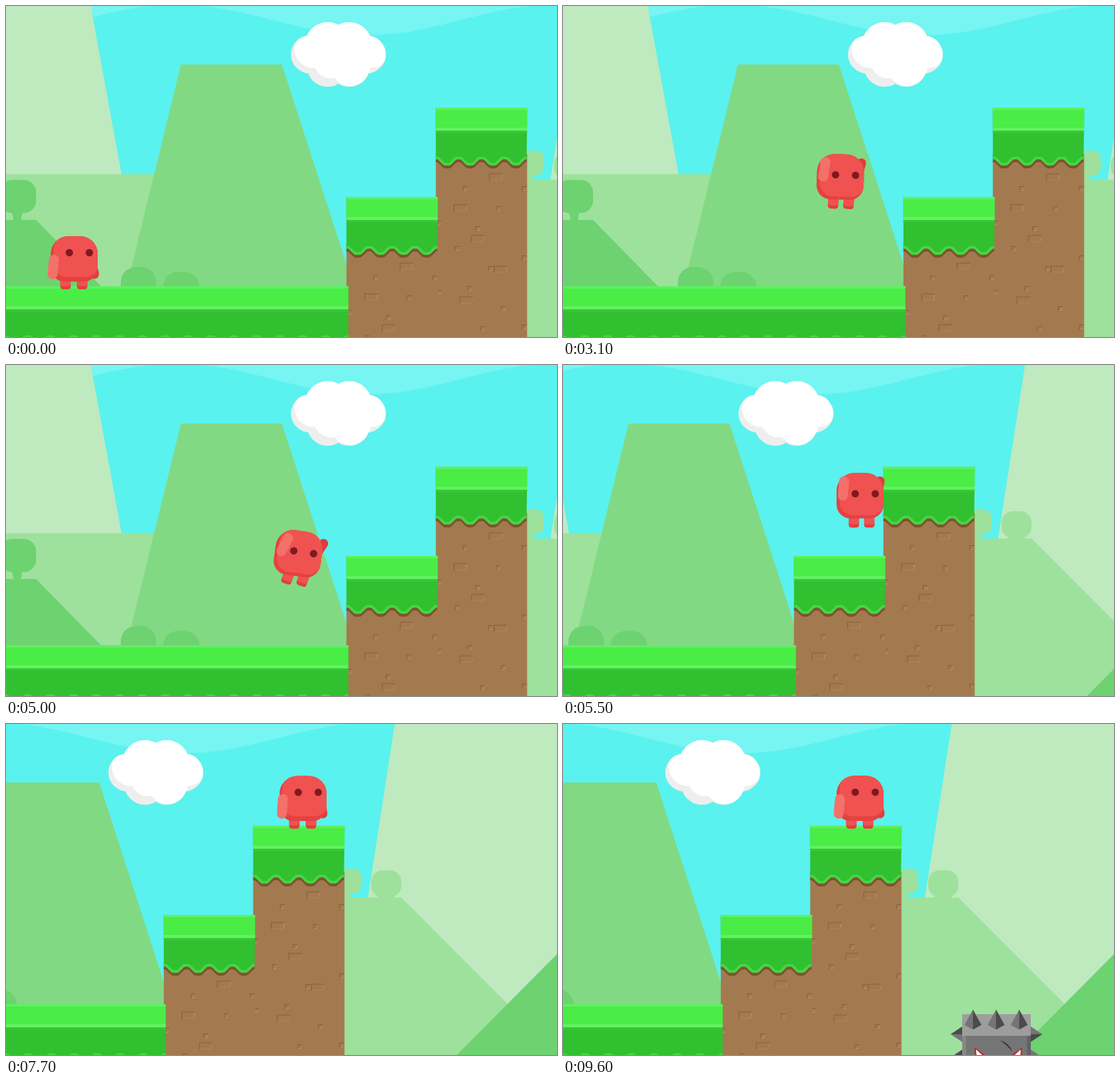
Animation of 715x430 px, one loop 9700 ms. Source, as an HTML page with a canvas:

```html
<!DOCTYPE html>
<html lang="en">
<head>
<meta charset="utf-8">
<title>Platform jump</title>
<style>
  html, body { margin: 0; width: 100%; height: 100%; overflow: hidden; background: #5af2ee; }
  canvas { display: block; }
</style>
</head>
<body>
<canvas id="stage" width="715" height="430"></canvas>
<script>
const ctx = document.getElementById('stage').getContext('2d');
const W = 715, H = 430, LOOP = 9700, STEP = 100;
const GRAVITY = 1412, JUMP = 565, AIR_JUMP = 524, HOP = 339;
const SKY = '#5af2ee', HAZE = '#76f5f3', FAR = '#bfe9bf', MID = '#9de19c', PEAK = '#82d983', NEAR = '#6dd270';
const GROUND = 368, LEDGE = 252, TOP = 136;

const START_X = 88;
// Runs: start and end in seconds, distance
const RUNS = [[2.055, 3.13, 279], [4.963, 5.5, 160], [5.96, 6.2, 61.5], [6.58, 6.75, 33.5]];
// Jumps: seconds, take-off speed, height of the floor below
const JUMPS = [
  [2.59, JUMP, GROUND], [4.35, JUMP, GROUND], [4.985, AIR_JUMP, LEDGE],
  [5.7, JUMP, LEDGE], [5.85, AIR_JUMP, TOP], [6.58, HOP, TOP]
];

const clamp = (v, a, b) => Math.max(a, Math.min(b, v));
const mix = (a, b, k) => a + (b - a) * k;

const walkX = t => RUNS.reduce((x, [a, b, d]) => x + d * clamp((t - a) / (b - a), 0, 1), START_X);

// Each jump takes off from wherever the one before has brought the feet
function feet(t) {
  let jump = [0, 0, GROUND], from = GROUND;
  const at = time => {
    const [t0, v, floor] = jump, d = time - t0;
    const y = from - v * d + GRAVITY / 2 * d * d;
    const landed = GRAVITY * d >= v && y >= floor;
    return { y: landed ? floor : y, air: !landed };
  };
  for (const next of JUMPS) {
    if (next[0] > t) break;
    from = at(next[0]).y;
    jump = next;
  }
  return at(t);
}

// Patrolling block bounces between the wall and a far turning point
function blockX(t) {
  const speed = 195, half = 2.3885, hit = 4.5;
  const d = Math.abs(((t - hit) % (2 * half) + 3 * half) % (2 * half) - half);
  return 677 + speed * d;
}

function poly(fill, ...p) {
  ctx.fillStyle = fill;
  ctx.beginPath();
  for (let i = 0; i < p.length; i += 2) ctx.lineTo(p[i], p[i + 1]);
  ctx.fill();
}

function rect(fill, x, y, w, h) {
  ctx.fillStyle = fill;
  ctx.fillRect(x, y, w, h);
}

function round(fill, x, y, w, h, r) {
  ctx.fillStyle = fill;
  ctx.beginPath();
  ctx.roundRect(x, y, w, h, r);
  ctx.fill();
}

function disc(x, y, r) {
  ctx.moveTo(x + r, y);
  ctx.arc(x, y, r, 0, 7);
}

function puffs(x, y, low) {
  ctx.beginPath();
  for (const s of [-1, 1]) {
    disc(x + 37 * s, y, 24.5);
    disc(x + 14 * s, y - 12.5, 29.5);
    disc(x + 14 * s, y + 15, low);
  }
}

function cloud() {
  ctx.save();
  puffs(431.3, 63, 27);
  ctx.fillStyle = '#eeeeee';
  ctx.fill();
  ctx.clip();
  puffs(436, 56, 23);
  disc(447, 78, 26);
  ctx.fillStyle = '#fff';
  ctx.fill();
  ctx.restore();
}

function backdrop() {
  ctx.fillStyle = HAZE;
  ctx.beginPath();
  ctx.moveTo(0, 0);
  for (let x = 0; x <= 960; x += 6) ctx.lineTo(x, Math.max(0, 18 + 20 * Math.cos((x - 468) / 78.5)));
  ctx.lineTo(960, 0);
  ctx.fill();

  poly(FAR, 0, 0, 110, 0, 150, 219, 0, 219);
  rect(MID, 0, 218.5, 200, 150);
  poly(PEAK, 227, 76, 358, 76, 452, 367, 156, 367);
  poly(NEAR, 0, 278, 39, 278, 124, 365, 0, 365);
  round(NEAR, -8, 226, 47, 43, 16);
  poly(NEAR, 7, 264, 22, 264, 19, 279, 10, 279);
  round(NEAR, 149, 339, 46, 50, 20);
  round(NEAR, 204, 345.5, 47, 50, 19);

  poly(FAR, 741.5, 0, 960, 0, 960, H, 706.5, H, 706.5, 226);
  round(MID, 660, 188, 38, 32, 10);
  rect(MID, 670, 216, 14, 12);
  round(MID, 711, 190, 39, 35, 15);
  rect(MID, 719, 222, 22, 6);
  poly(MID, 670, 225.5, 750, 225.5, 960, 436, 670, 436);
  poly(NEAR, 822, 430, 960, 291, 960, 430);
  cloud();
}

function edge(w, y) {
  for (let x = 0; x <= w; x += 2) {
    ctx.lineTo(x, y - clamp(5 * Math.cos(x / 29.75 * 2 * Math.PI), -4, 4));
  }
}

function scratch(x, y, w, h) {
  ctx.lineWidth = 1;
  ctx.strokeStyle = '#8a6040';
  ctx.strokeRect(x - w / 2, y - h / 2, w, h);
  ctx.strokeStyle = '#bd9067';
  ctx.beginPath();
  ctx.moveTo(x - w / 2 + 1, y + h / 2);
  ctx.lineTo(x + w / 2, y + h / 2);
  ctx.lineTo(x + w / 2, y - h / 2 + 1);
  ctx.stroke();
}

function dirt(w) {
  rect('#a37a4f', 0, 60, w, H);
  for (let i = 0; i < 5; i++) scratch(57 + 28 * Math.sin(2.3 + i * 1.95), 90 + 40 * i, 16, 8);
  for (let i = 0; i < 8; i++) scratch(26 + (0.17 + i * 0.618) % 1 * 70, 105 + 26 * i, 5, 5);
  for (let i = 0; i < 5; i++) scratch(i % 2 ? 4 : 115, 105 + 45 * i, 5, 5);
}

function platform(x, y, w) {
  ctx.save();
  ctx.translate(x, y);
  ctx.beginPath();
  ctx.rect(0, 0, w, H - y);
  ctx.clip();
  dirt(w);

  ctx.lineJoin = 'round';
  ctx.beginPath();
  edge(w, 73);
  ctx.lineWidth = 4;
  ctx.strokeStyle = '#7f5230';
  ctx.stroke();

  ctx.beginPath();
  ctx.moveTo(0, 0);
  edge(w, 70);
  ctx.lineTo(w, 0);
  ctx.fillStyle = '#30c030';
  ctx.fill();
  ctx.beginPath();
  edge(w, 69.5);
  ctx.lineWidth = 3.5;
  ctx.strokeStyle = '#45d643';
  ctx.stroke();

  rect('#4aec46', 0, 0, w, 26);
  rect('#5ff062', 0, 0, w, 3);
  rect('#63f060', 0, 26, w, 4);
  rect('#36c837', 0, 30, w, 3);
  ctx.restore();
}

// Two-tone spike: tip, then a base of given half width with a pointed foot
function spike(x, y, deg, len, half, foot) {
  ctx.save();
  ctx.translate(x, y);
  ctx.rotate(deg * Math.PI / 180);
  poly('#747474', 0, 0, -half, len, 0, len + foot);
  poly('#4b4b4b', 0, 0, half, len, 0, len + foot);
  ctx.restore();
}

function block(x) {
  ctx.save();
  ctx.translate(x, 371);
  for (const y of [32, 62]) {
    spike(0, y, -90, 15, 10, 0);
    spike(119, y, 90, 15, 10, 0);
  }
  rect('#757575', 15, 6, 89, 89);
  rect('#9d9d9d', 15, 6, 89, 28);
  rect('#878787', 15, 34, 5, 60);
  rect('#626262', 99, 34, 5, 60);
  for (const cx of [29, 59, 89]) spike(cx, 0, 0, 20, 11, 6);
  for (const s of [-1, 1]) {
    const ex = 62 + 24 * s;
    poly('#c02c2c', ex + 7 * s, 49, ex - 8 * s, 60, ex + 6 * s, 66);
    poly('#fff', ex + 5 * s, 52, ex - 4 * s, 60, ex + 4 * s, 64);
  }
  ctx.fillStyle = '#2c2c2c';
  ctx.beginPath();
  ctx.moveTo(64, 40);
  ctx.quadraticCurveTo(76, 43, 80, 55);
  ctx.quadraticCurveTo(74, 46, 64, 40);
  ctx.fill();
  ctx.restore();
}

function limb(fill, x, y, deg, w, len, r) {
  ctx.save();
  ctx.translate(x, y);
  ctx.rotate(deg * Math.PI / 180);
  round(fill, -w / 2, -5, w, len + 5, r);
  ctx.restore();
}

function hero(t, x) {
  let air = 0;
  for (let i = 0; i < 8; i++) air += feet(Math.max(0, t - i * 0.012)).air / 8;
  const lean = clamp((walkX(t + 0.06) - walkX(t)) / 0.06 / 290, 0, 1) ** 2;
  const sway = Math.sin(t * 2 * Math.PI) * (1 - air);
  const stride = Math.sin(t * 18) * 22 * lean * (1 - air);

  ctx.save();
  ctx.translate(x, feet(t).y - 36);
  ctx.rotate(lean * 8 * Math.PI / 180);
  ctx.translate(0, 36);

  limb('#df3c3c', 22, -40, mix(-13 - sway * 2, -168 + lean * 14, air), 12, 27, 6);
  for (const s of [-1, 1]) {
    const lx = mix(0, 2.5, air) + s * mix(10.8, 10, air);
    const turn = lean * 12 * air + s * stride;
    limb('#e23d3d', lx, -15, turn, 13.5, 15, 4);
    limb('#ef5250', lx, -15, turn, 13, 11, 3);
  }

  ctx.save();
  ctx.translate(0, -10);
  ctx.scale(1, 1 + sway * 0.01);
  ctx.translate(0, 10);
  ctx.beginPath();
  ctx.roundRect(-30, -mix(69, 71, air), 61, 59, [23, 23, 18, 18]);
  ctx.fillStyle = '#e54140';
  ctx.fill();
  ctx.clip();
  round('#ef5250', -26, -74, 58, 58, [22, 22, 17, 17]);
  ctx.fillStyle = '#7e1a1e';
  ctx.beginPath();
  for (const s of [-1, 1]) disc(7.2 + 13 * s, mix(-47.5, -44, air), 4.8);
  ctx.fill();
  ctx.restore();

  limb('#f4706a', mix(-25.5, -22, air), -40, mix(6 + sway * 2, 185 + lean * 14, air), 13, 27, 6.5);
  ctx.restore();
}

function draw(t) {
  const x = walkX(t), cam = Math.max(0, x - 385);
  rect(SKY, 0, 0, W, H);
  ctx.save();
  ctx.translate(-cam, 0);
  backdrop();
  block(blockX(t));
  platform(557.5, 132, 119);
  platform(441.5, 248, 119);
  platform(-31.5, 364, 476);
  hero(t, x);
  ctx.restore();
}

const start = performance.now();
function tick() {
  const ms = (performance.now() - start) % LOOP;
  draw(Math.floor(ms / STEP) * STEP / 1000);
  requestAnimationFrame(tick);
}
tick();
</script>
</body>
</html>
```
